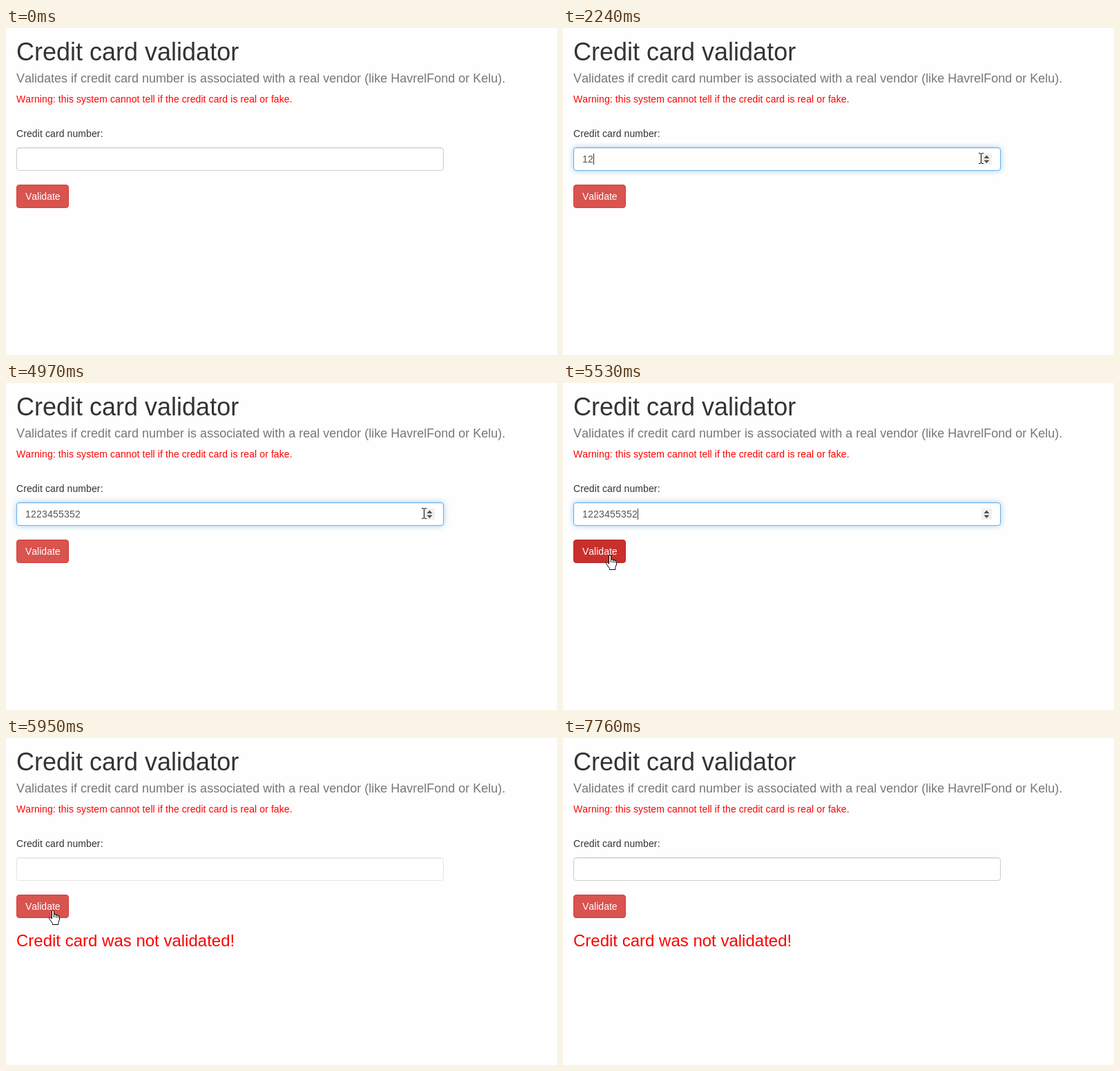
Recreate the animation shown at these times as an HTML page. Size 798x474 px, loop 8 s.

```html
<!DOCTYPE html>
<html lang="en">
<head>
<meta charset="utf-8">
<title>Credit card validator</title>
<style>
  html, body { margin: 0; width: 100%; height: 100%; overflow: hidden; background: #fefefe; }
  body { position: relative; font: 14px/20px "Liberation Sans", Arial, sans-serif; font-kerning: none; color: #333; }
  body > *, #field > * { position: absolute; box-sizing: border-box; white-space: pre; }
  body > div { left: 15px; }
  #title { top: 14px; font-size: 36px; line-height: 41px; }
  #lead { top: 63px; font-size: 18px; color: #777; }
  #warning, #label { letter-spacing: .1px; }
  #warning { top: 93px; color: #f00; }
  #label { top: 143px; }
  #field {
    top: 173px; width: 619px; height: 34px; color: #555; background: #fff;
    border: 1px solid #ccc; border-radius: 4px; box-shadow: inset 0 1px 1px rgba(0,0,0,.075);
  }
  #field.focus {
    border-color: #66afe9;
    box-shadow: inset 0 1px 1px rgba(0,0,0,.075), 0 0 8px rgba(102,175,233,.6);
  }
  #value { left: 12px; top: 6px; letter-spacing: .2px; }
  #caret { top: 8px; width: 1px; height: 16px; background: #333; }
  #spinner { left: 590px; top: 8px; width: 15px; height: 16px; background: #f0f0f0; fill: #505050; }
  #button {
    top: 227px; width: 76px; height: 34px; padding: 6px 12px; color: #fff;
    background: #d9534f; border: 1px solid #d43f3a; border-radius: 4px;
  }
  #button.hover { background: #c9302c; border-color: #ac2925; }
  #button.press { box-shadow: inset 0 3px 5px rgba(0,0,0,.125); }
  #message { top: 280px; font-size: 24px; line-height: 27px; color: #f00; }
  #pointer { left: 0; top: 0; width: 24px; height: 24px; overflow: visible; fill: #fff; stroke: #000; }
</style>
</head>
<body>
<div id="title">Credit card validator</div>
<div id="lead">Validates if credit card number is associated with a real vendor (like HavrelFond or Kelu).</div>
<div id="warning">Warning: this system cannot tell if the credit card is real or fake.</div>
<div id="label">Credit card number:</div>
<div id="field"><span id="value"></span><i id="caret"></i><svg id="spinner"><path d="M3.5 7L7.5 2.5L11.5 7ZM3.5 9.5H11.5L7.5 14Z"/></svg></div>
<div id="button">Validate</div>
<div id="message">Credit card was not validated!</div>
<svg id="pointer">
  <path id="arrow" d="M.5 .5V16L4 12.7L6.5 18.3L8.9 17.3L6.5 11.8H11.5Z"/>
  <path id="beam" fill="none" d="M-3 -7.5H-1L.5 -6.5L2 -7.5H4M.5 -6.5V6.5M-3 7.5H-1L.5 6.5L2 7.5H4"/>
  <path id="hand" stroke-linejoin="round" d="M-1.5 1Q-1.5 -.5 0 -.5T1.5 1V6.5Q1.5 5.5 3 5.5T4.5 7Q4.5 6 6 6.3T7.2 8Q7.4 7.2 8.5 7.5T9.5 9V13L7.8 17.5V20.5H-.7V18.5L-5 12.5Q-6.5 10 -5 9.7T-1.5 12ZM1.5 6.5V10M4.5 7V10.5M7.2 8V11"/>
</svg>
<script>
const LOOP = 8000, NUMBER = "1223455352";
const $ = id => document.getElementById(id);
const within = (t, a, b) => t >= a && t < b;
const last = (list, t) => list.filter(k => k[0] <= t).pop();
const show = (id, on) => $(id).style.display = on ? "block" : "none";

// [time, digits typed, caret shown]
const typing = [
  [0, 0, 0], [1290, 0, 1], [1710, 0, 0], [2090, 1, 1], [2240, 2, 1], [2670, 3, 1],
  [2960, 4, 1], [3140, 5, 1], [3320, 6, 1], [3500, 7, 1], [4030, 7, 0],
  [4150, 8, 1], [4290, 9, 1], [4430, 10, 1], [4850, 10, 0], [5400, 10, 1],
  [5670, 10, 0], [5800, 0, 0]
];

// [time, x, y, shape]
const moves = [
  [0, 0, 0, ""], [410, 706, 199, "arrow"], [550, 672, 196, "arrow"], [690, 643, 193, "arrow"],
  [840, 618, 190, "beam"], [980, 605, 189, "beam"],
  [4990, 520, 215, "arrow"], [5130, 330, 262, "arrow"], [5270, 150, 287, "arrow"],
  [5400, 72, 256, "hand"], [5530, 68, 250, "hand"],
  [6350, 92, 268, "arrow"], [6490, 150, 284, "arrow"], [6640, 270, 215, "arrow"],
  [6780, 394, 110, "arrow"], [6930, 385, 42, "arrow"], [7070, 362, 62, "arrow"],
  [7350, 420, 50, "arrow"], [7490, 560, 30, "arrow"], [7620, 673, 8, "arrow"], [7760, 0, 0, ""]
];

function draw(t) {
  const [, count, caret] = last(typing, t);
  $("value").textContent = NUMBER.slice(0, count);
  $("caret").style.left = 12 + 8 * count + "px";
  show("caret", caret);

  $("field").className = within(t, 1290, 5670) ? "focus" : "";
  $("field").style.borderColor = within(t, 5800, 5950) ? "#f4f4f4" : within(t, 5950, 6070) ? "#e5e5e5" : "";
  show("spinner", within(t, 840, 5670));

  $("button").className = within(t, 5400, 5670) ? "hover" : within(t, 5670, 5800) ? "hover press" : "";
  $("message").style.opacity = t < 5800 ? 0 : t < 5950 ? .5 : 1;

  const [, x, y, shape] = last(moves, t);
  $("pointer").style.transform = `translate(${x}px, ${y}px)`;
  for (const id of ["arrow", "beam", "hand"]) show(id, id === shape);
}

function tick() {
  draw(performance.now() % LOOP);
  requestAnimationFrame(tick);
}
tick();
</script>
</body>
</html>
```
